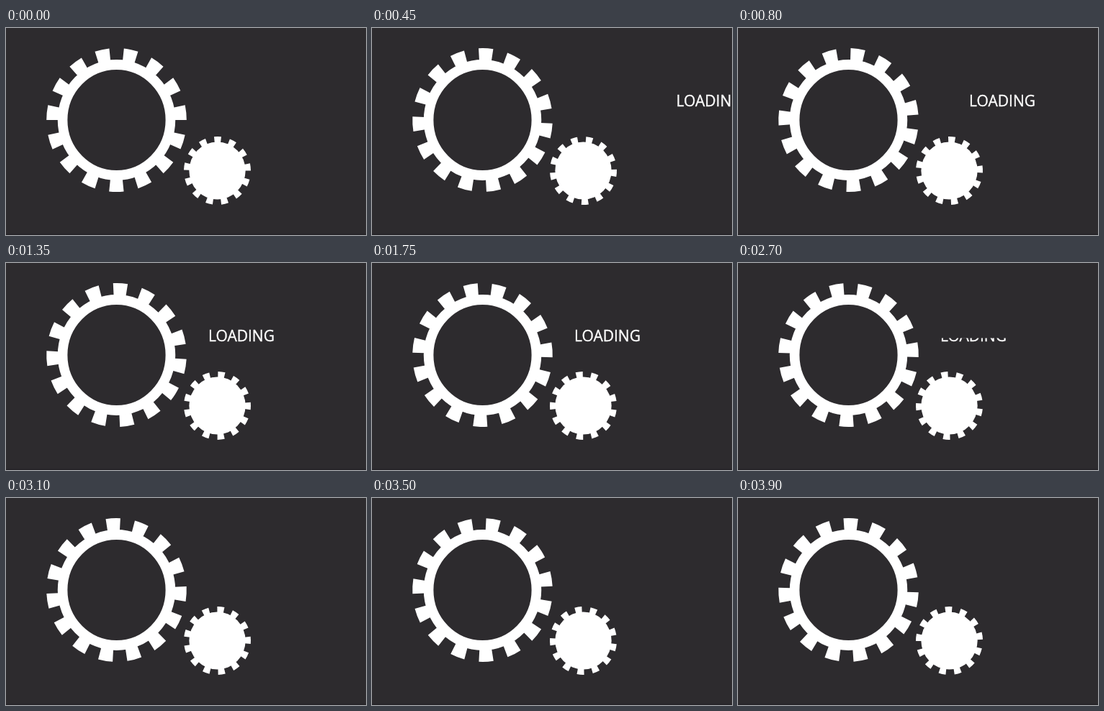
Recreate the animation shown at these times as an HTML page. Size 500 by 288 pixels, loop 3950 ms.

```html
<!DOCTYPE html>
<html lang="en">
<head>
<meta charset="utf-8">
<title>Loading</title>
<style>
  html, body { margin: 0; width: 100%; height: 100%; overflow: hidden; background: #2d2b2e; }
  svg { display: block; width: 100%; height: 100%; }
  text { font: 21px "Open Sans", "Noto Sans", sans-serif; fill: #fff; stroke: #fff; stroke-width: .35px; }
  circle { fill: none; stroke: #fff; }
</style>
</head>
<body>
<svg viewBox="0 0 500 288">
  <clipPath id="wipe"><rect id="wipeRect" width="500" height="288"/></clipPath>
  <rect y="286.5" width="500" height="1.5" fill="#252326"/>

  <g transform="translate(153.5 128) scale(.973 1)">
    <circle r="77" stroke-width="14"/>
    <circle id="bigTeeth" r="91.5" stroke-width="17" pathLength="360"
      stroke-dasharray="12 12" stroke-dashoffset="6"/>
  </g>

  <g transform="translate(293.5 198.5) scale(.979 1)">
    <circle r="40" style="fill:#fff; stroke:none"/>
    <circle id="smallTeeth" r="43.25" stroke-width="8.5" pathLength="351"
      stroke-dasharray="12.2 14.8" stroke-dashoffset="6.1"/>
  </g>

  <g clip-path="url(#wipe)"><text id="label" y="109.2">LOADING</text></g>
</svg>
<script>
const LOOP = 3950, STEP = 50, EASE_TIME = 4000;
const keyTimes = [0, 800, 1350, 2150, 2700, 3100, 3900, 4000];
// Clockwise degrees from the top at each key time.
const bigKeys = [12, 55.8, 123.2, 243.8, 325.8, 381.1, 433.9, 434.7];
const smallKeys = [0.6, -51, -131, -274.9, -368.8, -437, -499.8, -500.7];
const el = id => document.getElementById(id);

// Cubic interpolation whose speed follows an ease-in-out curve.
function gearAngle(keys, t) {
  const i = keyTimes.findLastIndex(k => k <= t);
  const span = keyTimes[i + 1] - keyTimes[i];
  const u = (t - keyTimes[i]) / span;
  const total = keys.at(-1) - keys[0];
  const slope = k => {
    const p = k / EASE_TIME;
    return total * 6 * p * (1 - p) / EASE_TIME * span;
  };
  const blend = u * u * (3 - 2 * u);
  return keys[i] + (keys[i + 1] - keys[i]) * blend
    + slope(keyTimes[i]) * u * (1 - u) ** 2
    - slope(keyTimes[i + 1]) * u * u * (1 - u);
}

function draw(t) {
  const turn = (id, keys) =>
    el(id).setAttribute("transform", `rotate(${gearAngle(keys, t) - 90})`);
  turn("bigTeeth", bigKeys);
  turn("smallTeeth", smallKeys);
  el("label").setAttribute("x", 281 + 0.29 * Math.max(0, 938 - t));
  el("label").style.display = t < 3100 ? "" : "none";
  el("wipeRect").setAttribute("y", t < 2000 ? 0 : 95 + (t - 2000) * 0.0136);
}

const start = performance.now();
function tick() {
  const t = (performance.now() - start) % LOOP;
  draw(Math.floor(t / STEP) * STEP);
  requestAnimationFrame(tick);
}
tick();
</script>
</body>
</html>
```
